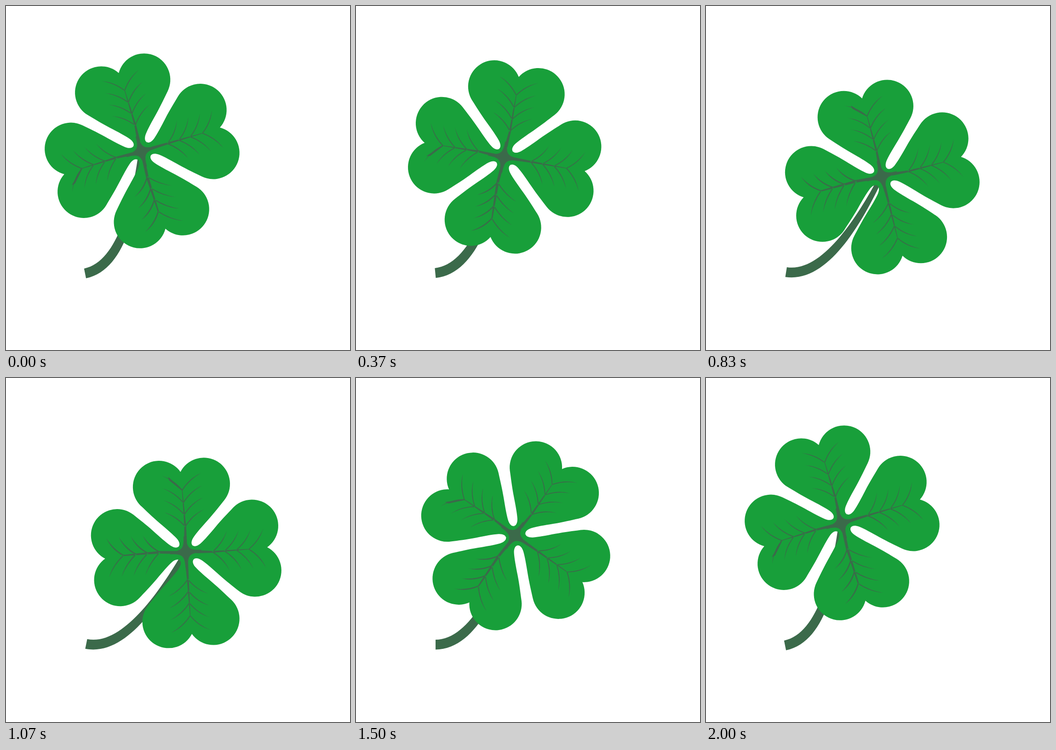
Recreate the animation shown at these times as an HTML page with a canvas. Size 748 by 748 pixels, loop 2.03 s.

```html
<!DOCTYPE html>
<html lang="en">
<head>
<meta charset="utf-8">
<title>Swaying clover</title>
<style>
  html, body { margin: 0; width: 100%; height: 100%; overflow: hidden; background: #fff; }
  canvas { display: block; width: 748px; height: 748px; }
</style>
</head>
<body>
<canvas id="stage" width="748" height="748"></canvas>
<script>
const ctx = document.getElementById('stage').getContext('2d');
const LOOP = 2030;
const GREEN = '#189f3a', DARK = '#3b6a4a';
const RAD = Math.PI / 180;
const PIVOT = { x: 181.4, y: 586.2 };
const HUB = { x: 165.85, y: -243.2 };   // flower centre, seen from the pivot
const LOBE = { x: 48.7, y: -147, r: 57 };

// Half of the gap between two leaves: distance along the diagonal, half width.
const GAP = [[141, 12.6], [124, 12], [108, 10.8], [85, 11.1],
             [66, 11.4], [48, 11.6], [36, 10.2], [27, 9], [21.5, 5], [21.5, 0]];

function diagonal([u, v], side) {
  const k = Math.SQRT1_2;
  return [side * (u - v) * k, -(u + v) * k];
}

function makeLeaf() {
  const p = new Path2D();
  const right = GAP.map(q => diagonal(q, 1));
  const left = GAP.map(q => diagonal(q, -1)).reverse();
  const curves = pts => {
    for (let i = 1; i < pts.length; i += 3) {
      p.bezierCurveTo(...pts[i], ...pts[i + 1], ...pts[i + 2]);
    }
  };
  const lobeAngle = (x, y, cx) => Math.atan2(y - LOBE.y, x - cx);
  const notch = -Math.sqrt(LOBE.r ** 2 - LOBE.x ** 2);
  const end = right[0], start = left[left.length - 1];
  p.moveTo(0, 0);
  p.lineTo(...left[0]);
  curves(left);
  p.arc(-LOBE.x, LOBE.y, LOBE.r, lobeAngle(...start, -LOBE.x), Math.atan2(notch, LOBE.x));
  p.arc(LOBE.x, LOBE.y, LOBE.r, Math.atan2(notch, -LOBE.x), lobeAngle(...end, LOBE.x));
  curves(right);
  p.closePath();
  return p;
}

// root, low, high: sideways place of the midrib at three heights.
function makeVeins({ root, low, high, thick, bar }) {
  const p = new Path2D();
  const near = thick ? 2.8 : 2, far = thick ? 1.3 : 0.5;
  const rib = y => low + (high - low) * (-58 - y) / 80;
  p.moveTo(root - 3.2, -22);
  p.lineTo(low - near, -58);
  p.lineTo(high - far, -138);
  p.lineTo(high + far, -138);
  p.lineTo(low + near, -58);
  p.lineTo(root + 3.2, -22);
  p.closePath();
  // side veins
  for (const y of [-58, -84, -110, -137.5]) {
    const x = rib(y);
    for (const side of [-1, 1]) {
      const w = thick && side > 0 ? 4.2 : 2.8;
      p.moveTo(x, y - 0.5);
      p.quadraticCurveTo(1.5 + side * 17, y - 24, 1.5 + side * 43, y - 33.5);
      p.quadraticCurveTo(1.5 + side * 17, y - 24 + w, x, y + w - 0.5);
      p.closePath();
    }
  }
  if (bar) {
    p.moveTo(high, -138.5);
    p.lineTo(-27.5, -168);
    p.lineTo(-26, -160);
    p.lineTo(high, -135);
    p.closePath();
  }
  return p;
}

function makeHub() {
  const p = new Path2D();
  p.moveTo(2.7, -34);
  p.bezierCurveTo(3, -8, 8, -3, 34, -2.7);
  p.lineTo(34, 2.7);
  p.bezierCurveTo(8, 3, 3, 8, 2.7, 34);
  p.lineTo(-2.7, 34);
  p.bezierCurveTo(-3, 8, -8, 3, -34, 2.7);
  p.lineTo(-34, -2.7);
  p.bezierCurveTo(-8, -3, -3, -8, -2.7, -34);
  p.closePath();
  return p;
}

const stem = new Path2D('M173 569C250 569 306 440 339 345L348 350C319 448 267 590 173 590.5Z');
const leaf = makeLeaf();
const hub = makeHub();
const veins = [
  { root: -1, low: 1.8, high: 1.5 },
  { root: 0.5, low: 0.4, high: 0.9 },
  { root: 2.5, low: 5.4, high: 4, thick: true },
  { root: 0, low: 2, high: 0.9, bar: true }
].map(makeVeins);

// Sway from -1 to 1 and back, stepped at 30 pictures a second.
function sway(ms) {
  const slot = Math.floor((Math.floor(ms / 10) * 10 + 3.4) * 0.03);
  const step = slot % 15 ? slot - 1 : slot;
  const x = 1 - Math.abs(1 - step / 30);
  return 2 * x * x * (3 - 2 * x) - 1;
}

function fill(path, color) {
  ctx.fillStyle = color;
  ctx.fill(path);
}

function eachLeaf(draw) {
  for (let i = 0; i < 4; i++) {
    ctx.save();
    ctx.rotate(i * Math.PI / 2);
    draw(i);
    ctx.restore();
  }
}

function render(ms) {
  const s = sway(ms);
  ctx.fillStyle = '#fff';
  ctx.fillRect(0, 0, 748, 748);
  ctx.save();
  ctx.translate(PIVOT.x, PIVOT.y);
  ctx.rotate(11.4 * s * RAD);
  ctx.save();
  ctx.translate(-PIVOT.x, -PIVOT.y);
  fill(stem, DARK);
  ctx.restore();
  ctx.translate(HUB.x, HUB.y);
  ctx.rotate((34.8 + 40.1 * s) * RAD);
  ctx.fillStyle = GREEN;
  ctx.fillRect(-14, -14, 28, 28);
  eachLeaf(() => fill(leaf, GREEN));
  eachLeaf(i => fill(veins[i], DARK));
  ctx.translate(-2, 0.7);
  fill(hub, DARK);
  ctx.restore();
}

const began = performance.now();
function tick() {
  render((performance.now() - began) % LOOP);
  requestAnimationFrame(tick);
}
tick();
</script>
</body>
</html>
```
